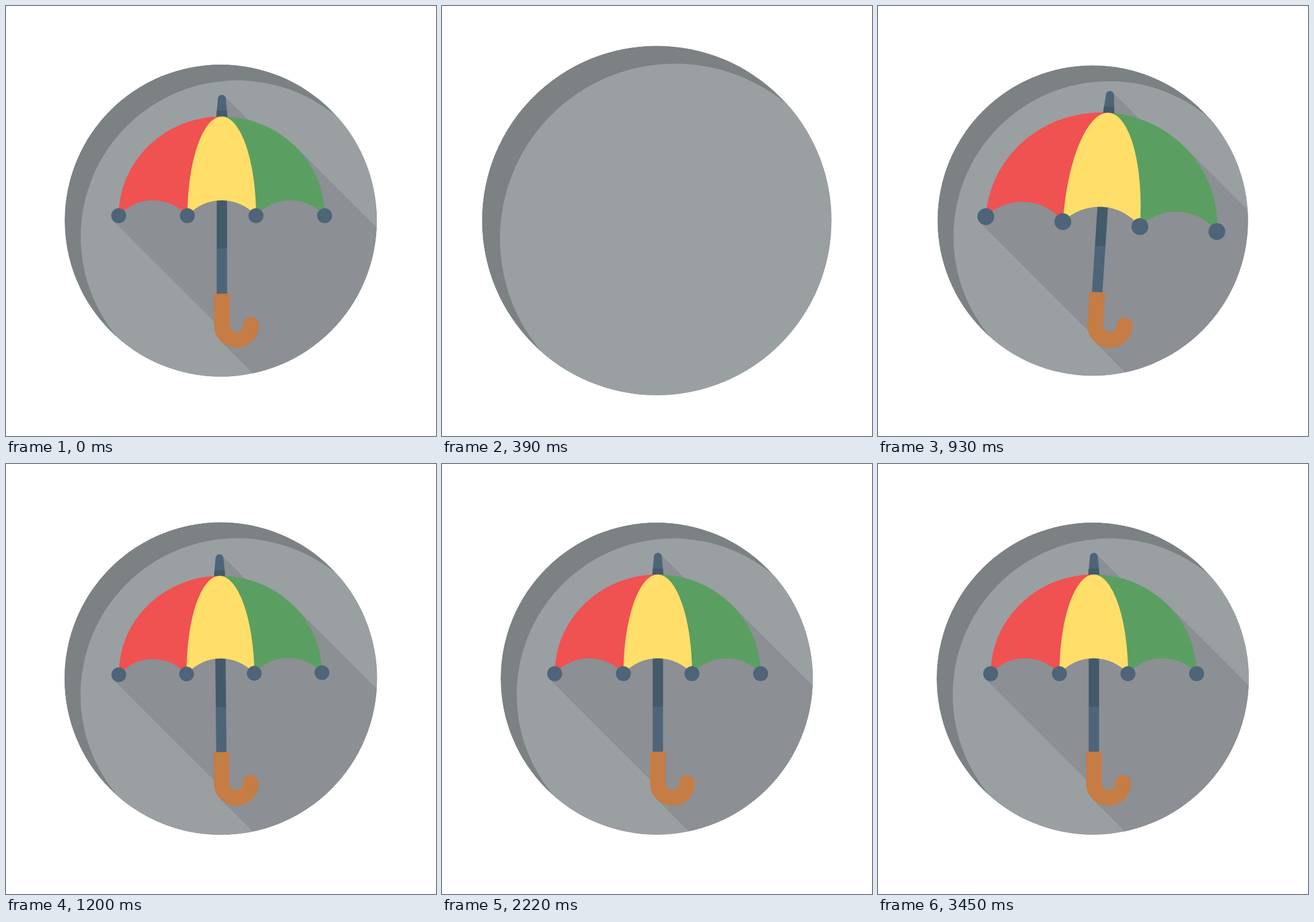
Recreate the animation shown at these times as an HTML page. Size 748 by 748 pixels, loop 3600 ms.

```html
<!DOCTYPE html>
<html lang="en">
<head>
<meta charset="utf-8">
<title>Umbrella</title>
<style>
  html, body { margin: 0; width: 100%; height: 100%; overflow: hidden; background: #fff; }
  svg { display: block; width: 100%; height: 100%; }
</style>
</head>
<body>
<svg viewBox="0 0 748 748">
  <defs>
    <clipPath id="discClip"><circle cx="373.5" cy="373.2" r="271.5"/></clipPath>
  </defs>
  <g id="disc" clip-path="url(#discClip)">
    <circle cx="373.5" cy="373.2" r="271.5" fill="#7c8184"/>
    <circle cx="401.8" cy="401.4" r="271.8" fill="#9a9fa2"/>
    <path d="M401.8 129.6A271.8 271.8 0 0 1 401.8 673.2L660 660V380Z" fill="#9a9fa2"/>
    <path id="shadow" fill="#8c8f93"/>
  </g>
  <g id="umbrella">
    <path d="M366.5 190H384.5V422H366.5Z" fill="#435a68"/>
    <path d="M366.5 422H384.5V502H366.5Z" fill="#4d6479"/>
    <path d="M365.8 193L368.6 161.5A6.9 6.9 0 0 1 382.4 161.5L385.2 193Z" fill="#4d6479"/>
    <path d="M365.8 193L366.7 182H384.3L385.2 193Z" fill="#435a68"/>
    <path d="M375.5 500.5V555.5A25.3 25.3 0 0 0 426.1 555.5V554.5" fill="none" stroke="#c57c45" stroke-width="27.2"/>
    <circle cx="426.1" cy="554.5" r="13.6" fill="#c57c45"/>
    <g id="canopy">
      <path d="M196 365A179.3 172.8 0 0 1 375.3 192.2L375.3 300L315.6 365A79.6 79.6 0 0 0 196 365Z" fill="#f05151"/>
      <path d="M554.4 365A179.3 172.8 0 0 0 375.3 192.2L375.3 300L435 365A79.6 79.6 0 0 1 554.4 365Z" fill="#5a9f61"/>
      <path d="M315.6 365A59.7 172.8 0 0 1 435 365A79.6 79.6 0 0 0 315.6 365Z" fill="#ffde69"/>
      <g id="tips" fill="#4d6479"></g>
    </g>
  </g>
</svg>
<script>
const LOOP = 3600, STEP = 30;
const CENTER = [373.5, 373.2], GRIP = [400.6, 594.5], APEX = [375.3, 192.2];
const TIPS = [196, 315.5, 434.8, 554.2].map(x => [x, 364.8]);
const TIP_RADIUS = 13;
const FAR = 900;
const byId = id => document.getElementById(id);

byId('tips').innerHTML = TIPS.map(([x, y]) => `<circle cx="${x}" cy="${y}" r="${TIP_RADIUS}"/>`).join('');

// Remaining offset (1 -> 0) of a damped spring that starts at rest.
function springRest(sec) {
  if (sec <= 0) return 1;
  const k = 5.845, w = 8.897;
  return Math.exp(-k * sec) * (Math.cos(w * sec) + k / w * Math.sin(w * sec));
}

// Remaining offset (1 -> 0) of a one second elastic ease-out.
function elasticRest(sec) {
  if (sec <= 0) return 1;
  if (sec >= 1) return 0;
  return 2 ** (-10 * sec) * Math.cos(2 * Math.PI * sec / 0.7);
}

const scaleAbout = ([x, y], s) => `translate(${x} ${y}) scale(${s}) translate(${-x} ${-y})`;

// Points on a circle or elliptical arc.
function arcPoints([cx, cy], rx, ry, from, to, count) {
  return Array.from({ length: count + 1 }, (_, i) => {
    const a = (from + (to - from) * i / count) * Math.PI / 180;
    return [cx + rx * Math.cos(a), cy + ry * Math.sin(a)];
  });
}
const circlePoints = (c, r) => arcPoints(c, r, r, 0, 360, 48);

const DOME = arcPoints([375.3, 365], 179.3, 172.8, 180, 360, 60);
const TIP_OUTLINES = TIPS.map(c => circlePoints(c, TIP_RADIUS));
const STICK_PARTS = [
  [[365.8, 193], [385.2, 193], ...circlePoints([375.5, 162], 6.9)],
  [[366.5, 190], [384.5, 190], [384.5, 502], [366.5, 502]],
  [[361.9, 500.5], [389.1, 500.5], [389.1, 556], [361.9, 556]],
  circlePoints([400.8, 555.5], 38.9)
];

// Area swept by a convex part along the diagonal light direction.
function sweep(points, ridge) {
  const slant = p => p[0] - p[1];
  const low = points.reduce((a, b) => slant(b) < slant(a) ? b : a);
  const high = points.reduce((a, b) => slant(b) > slant(a) ? b : a);
  const cast = p => [p[0] + FAR, p[1] + FAR];
  const outline = [low, ...(ridge ? [ridge] : []), high, cast(high), cast(low)];
  return 'M' + outline.map(p => p.map(v => v.toFixed(2)).join(' ')).join('L') + 'Z';
}

function shadowPath(size, degrees, open, discSize) {
  const a = degrees * Math.PI / 180, cos = Math.cos(a), sin = Math.sin(a);
  const place = ([px, py]) => {
    const x = (px - GRIP[0]) * size, y = (py - GRIP[1]) * size;
    const moved = [GRIP[0] + x * cos - y * sin, GRIP[1] + x * sin + y * cos];
    // The shadow lives inside the scaled disc, so undo the disc scale.
    return moved.map((v, i) => CENTER[i] + (v - CENTER[i]) / discSize);
  };
  const unfold = p => place(p.map((v, i) => APEX[i] + (v - APEX[i]) * open));
  const parts = STICK_PARTS.map(part => sweep(part.map(place)));
  if (open > 0) {
    parts.push(sweep(DOME.map(unfold), unfold(APEX)));
    TIP_OUTLINES.forEach(tip => parts.push(sweep(tip.map(unfold))));
  }
  return parts.join('');
}

function render(ms) {
  const frame = Math.floor(ms % LOOP / STEP) * STEP;
  const sec = (frame || LOOP) / 1000;   // the loop opens on the resting pose
  const discSize = 1 - springRest(sec - 0.067);
  const size = 1 - elasticRest(sec - 0.45);
  const degrees = -60 * elasticRest(sec - 0.538);
  const open = 1 - elasticRest(sec - 0.6193);
  const show = (id, on) => byId(id).setAttribute('display', on ? 'inline' : 'none');

  show('disc', discSize > 0);
  show('umbrella', size > 0);
  show('canopy', open > 0);
  byId('disc').setAttribute('transform', scaleAbout(CENTER, discSize));
  byId('umbrella').setAttribute('transform', `rotate(${degrees} ${GRIP}) ${scaleAbout(GRIP, size)}`);
  byId('canopy').setAttribute('transform', scaleAbout(APEX, open));
  byId('shadow').setAttribute('d', size > 0 ? shadowPath(size, degrees, open, discSize) : '');
}

const start = performance.now();
function tick() {
  render(performance.now() - start);
  requestAnimationFrame(tick);
}
render(0);
requestAnimationFrame(tick);
</script>
</body>
</html>
```
